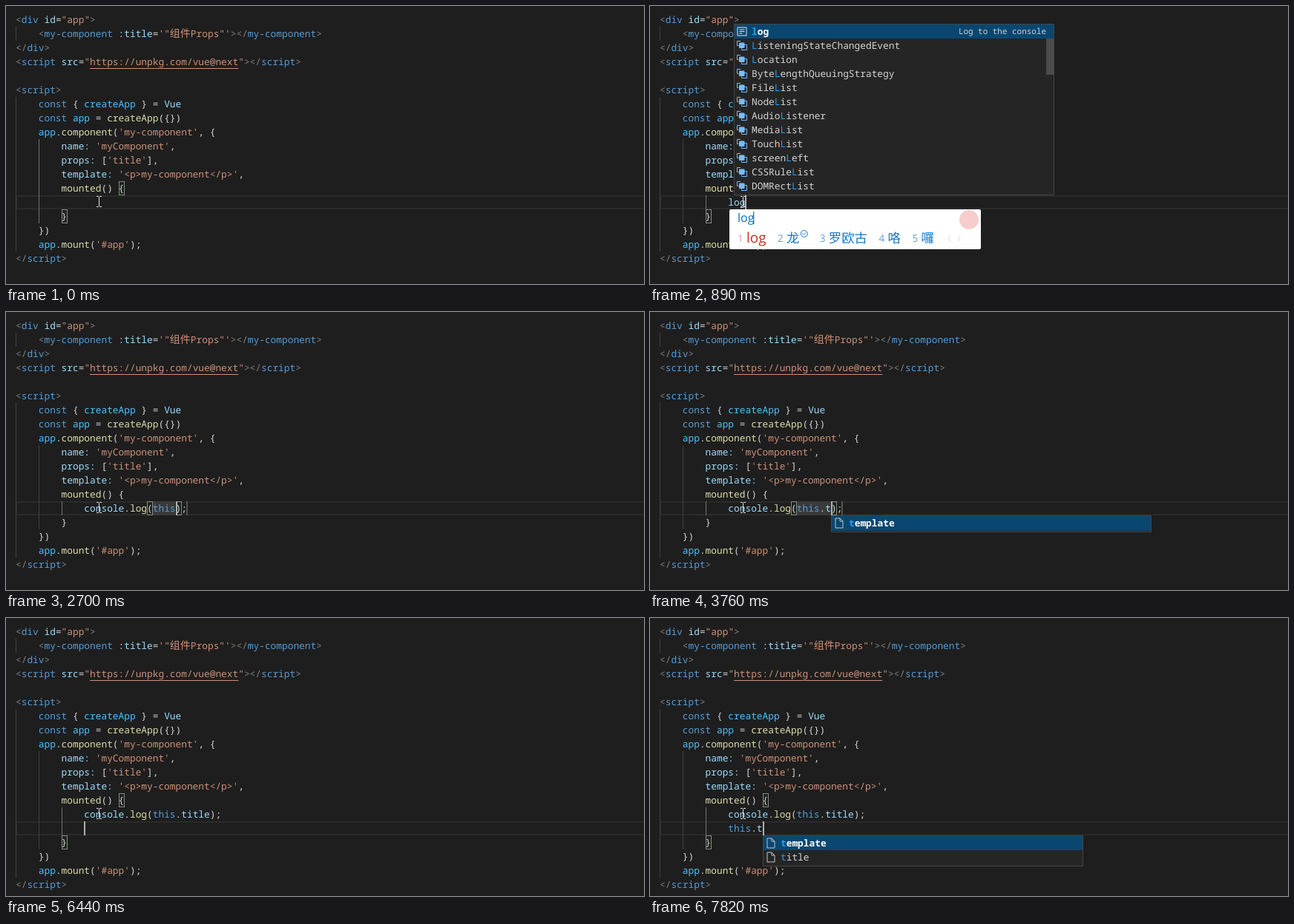
Animation of 860x376 px, one loop 8 s. Source, as an HTML page:

```html
<!DOCTYPE html>
<html lang="zh">
<head>
<meta charset="utf-8">
<title>Typing in a code editor</title>
<style>
  html, body { margin: 0; width: 860px; height: 376px; overflow: hidden; background: #1e1e1e; }
  svg { display: block; }
  text {
    white-space: pre;
    text-rendering: geometricPrecision;
    font: 12.83px "Noto Sans Mono", "DejaVu Sans Mono", monospace;
  }
  .cjk { font: 14px "Noto Sans CJK SC", "Noto Sans CJK", sans-serif; }
  .ime text { font-family: "Open Sans", "Noto Sans CJK SC", "Noto Sans CJK", sans-serif; }
</style>
</head>
<body>
<svg id="stage" width="860" height="376" viewBox="0 0 860 376"></svg>
<script>
const LOOP = 8000, LEFT = 13, TOP = 9, PITCH = 7.697, LINE = 19, EDIT = 13;
const stage = document.getElementById('stage');

const colX = col => LEFT + col * PITCH;
const rowY = row => TOP + row * LINE;
const esc = s => s.replace(/&/g, '&amp;').replace(/</g, '&lt;');
const rect = (x, y, w, h, fill, extra = '') =>
  `<rect x="${x}" y="${y}" width="${w}" height="${h}" fill="${fill}" ${extra}/>`;
const text = (x, y, body, extra = '') => `<text x="${x}" y="${y}" ${extra}>${body}</text>`;

// Code lines: [indent column, tokens]. Each token starts with its colour key.
const INK = {
  g: '#808080', b: '#569cd6', v: '#9cdcfe', s: '#ce9178', c: '#ce9178',
  f: '#dcdcaa', k: '#4fc1ff', w: '#d4d4d4'
};
const head = [
  [0, 'g<~bdiv ~vid~w=~s"app"~g>'],
  [4, `g<~bmy-component ~v:title~w=~s'"~c组件~sProps"'~g></~bmy-component~g>`],
  [0, 'g</~bdiv~g>'],
  [0, 'g<~bscript ~vsrc~w=~s"https://unpkg.com/vue@next"~g></~bscript~g>'],
  [0, ''],
  [0, 'g<~bscript~g>'],
  [4, 'bconst~w { ~kcreateApp~w } = ~vVue'],
  [4, 'bconst ~kapp~w = ~fcreateApp~w({})'],
  [4, "kapp~w.~fcomponent~w(~s'my-component'~w, {"],
  [8, "vname: ~s'myComponent'~w,"],
  [8, "vprops:~w [~s'title'~w],"],
  [8, "vtemplate: ~s'<p>my-component</p>'~w,"],
  [8, 'fmounted~w() {']
];
const tail = [
  [8, 'w}'],
  [4, 'w})'],
  [4, "kapp~w.~fmount~w(~s'#app'~w);"],
  [0, 'g</~bscript~g>']
];

const codeLine = ([col, src], row) => text(colX(col), rowY(row) + 14,
  src.split('~').filter(s => s.length > 1).map(s =>
    `<tspan fill="${INK[s[0]]}"${s[0] === 'c' ? ' class="cjk"' : ''}>${esc(s.slice(1))}</tspan>`).join(''));

const expr = s => s.startsWith('this')
  ? `bthis~w${s.slice(4, 5)}~v${s.slice(5)}` : 'v' + s;
const callSrc = arg => `vconsole~w.~flog~w(~${expr(arg)}~w);`;

// Suggestion lists
const items = (icon, names) => names.split(' ').map(name => ({ icon, name }));
const logItem = { icon: 'snippet', name: 'log', detail: 'Log to the console' };
const members = 'app component console createApp log mount mounted name props template';
const types = [logItem, ...items('type', 'ListeningStateChangedEvent Location ' +
  'ByteLengthQueuingStrategy FileList NodeList AudioListener MediaList TouchList ' +
  'screenLeft CSSRuleList DOMRectList')];
const pop = (col, list, match, opts) => ({ col, list, match, ...opts });

// Editor states
const word = (w, more) => ({ rows: ['v' + w], caret: 12 + w.length, brace: true, ...more });
const call = (arg, more) => ({ rows: [callSrc(arg)], caret: 24 + arg.length, arg, ...more });
const next = (s, popup) => ({
  rows: [callSrc('this.title'), expr(s)], caret: 12 + s.length, brace: true, popup
});

const typesPop = pop(13, types, /L|^l/, { above: true, thumb: true });
const onT = items('word', 'template');
const steps = [
  [0, { rows: [''], brace: true }],
  [450, word('l', { ime: ['l', '了', '来', '里', '老', '类'] })],
  [597, word('l', { ime: ['l', '了', '来', '里', '老', '类'], popup: typesPop })],
  [743, word('lo', { ime: ['lo', '咯', '罗', '落', '洛', '络'], popup: typesPop })],
  [890, word('log', { ime: ['log', 'log', '龙', '罗欧古', '咯', '囉'], popup: typesPop })],
  [1180, word('log', { popup: pop(15, [logItem, ...items('type', 'HTMLDialogElement')], /log/) })],
  [1650, call('')],
  [2250, call('t')],
  [2400, call('th')],
  [2550, call('thi')],
  [2700, call('this')],
  [3140, call('this.', { popup: pop(29, items('word', members + ' Vue')) })],
  [3610, call('this.t', { popup: pop(29, onT, /^t/) })],
  [3760, call('this.t', { popup: pop(30, onT, /^t/) })],
  [4060, call('this.ti')],
  [4380, call('this.tit')],
  [4950, call('this.titl')],
  [5250, call('this.title')],
  [5690, call('this.title', { caret: 35 })],
  [5845, call('this.title', { caret: 36, brace: true })],
  [6000, { rows: [callSrc('this.title')], caret: 36, brace: true }],
  [6440, next('')],
  [6910, next('t')],
  [7063, next('th')],
  [7217, next('thi')],
  [7370, next('this', pop(16, [...items('snippet', 'this'), ...items('type', 'globalThis ThisType')], /this/i))],
  [7670, next('this.', pop(17, items('word', members + ' title Vue'), null, { above: true }))],
  [7820, next('this.t', pop(18, items('word', 'template title'), /^t/))]
];

const bracket = (col, row) => rect(Math.round(colX(col)) + .5, rowY(row) + .5, 7, 18,
  'rgba(0,100,0,.1)', 'stroke="#888"');

const guide = (col, from, to, active) =>
  rect(Math.round(colX(col)), rowY(from), 1, (to - from) * LINE, active ? '#707070' : '#404040');

const ICONS = {
  snippet: '<path d="M-6 -5.5h12v11h-12zM-3.5 -2.5h7M-3.5 0h7M-3.5 2.5h4" stroke="#e4e4e4"/>',
  type: '<path d="M-2 -6h-4.5v6h2M3 -1h3.500v7h-7v-2" stroke="#75beff"/>' +
    '<rect x="-4" y="-4" width="7.500" height="7.500" rx="1" fill="#75beff"/>',
  word: '<path d="M-5 -6.500h6l4 4v9h-10zM1 -6.500v4h4" stroke="#c5c5c5"/>'
};

function drawPopup({ col, list, match, above, thumb }, row) {
  const x = Math.round(colX(col)), w = 432, h = list.length * LINE + 4;
  const y = above ? rowY(row) - h : rowY(row + 1);
  let out = rect(x + .5, y + .5, w - 1, h - 1, '#252526', 'stroke="#454545"');
  out += rect(x + 1, y + 1, w - 2, LINE + (list.length === 1 ? 1 : 0), '#094771');
  list.forEach(({ icon, name, detail }, i) => {
    const top = y + 1 + i * LINE;
    const label = match ? name.replace(match, m => `<tspan fill="#18a3ff">${m}</tspan>`) : name;
    out += `<g fill="none" transform="translate(${x + 11} ${top + 9.5})">${ICONS[icon]}</g>`;
    out += text(x + 24, top + 14, label,
      i ? 'fill="#d4d4d4"' : 'fill="#fff" style="font-weight:bold"');
    if (detail) out += text(x + 421, top + 13, detail,
      'fill="#c8d3dc" text-anchor="end" style="font-size:10.95px"');
  });
  if (thumb) out += rect(x + w - 11, y + 20, 10, 49, '#4b4b4b');
  return out;
}

function drawIme([typed, ...words]) {
  const size = n => `style="font-size:${n}px"`;
  const width = s => s.length * (s < '~' ? 8.8 : 17.4);
  let x = 118;
  let out = rect(107, 275, 339, 54, '#fff', 'rx="2"') +
    '<circle cx="430" cy="289" r="13" fill="#f6cccc"/>' +
    text(118, 292, typed, 'fill="#0f6cb4" ' + size(16)) +
    rect(118 + typed.length * 7.100, 278, 1, 17, '#0f4f86');
  words.forEach((w, i) => {
    out += text(x, 319, i + 1, `fill="${i ? '#5b9fd6' : '#f08fae'}" ` + size(13.5));
    out += text(x + 12, 320, w, `fill="${i ? '#1277c8' : '#c8301c'}" ` + size(w < '~' ? 19 : 17.4));
    x += 12 + width(w);
    if (w === '龙') {
      out += `<g transform="translate(${x + 6.5} 308)" fill="none" stroke="#1277c8">` +
        '<circle r="4.500"/><path d="M-2 0l1.500 1.500 3 -3"/></g>';
      x += 12;
    }
    x += 15.5;
  });
  out += '<path d="M405 311l-3 3.500 3 3.500M415 311l3 3.500 -3 3.500" fill="none" stroke="#bcdcf2"/>';
  return `<g class="ime">${out}</g>`;
}

function draw({ rows, caret, brace, arg, popup, ime }) {
  const n = rows.length, row = EDIT + n - 1, y = rowY(row), end = EDIT + n;
  const empty = rows[0] === '';
  let out = rect(0, 0, 860, 376, '#1e1e1e');
  out += rect(LEFT + 1, y + 1, 900, LINE - 2, 'none', 'stroke="#2a2a2a" stroke-width="2"');
  out += guide(0, 1, 2) + guide(0, 6, end + 3) + guide(4, 9, end + 1, empty);
  if (!empty) out += guide(8, EDIT, end, true);

  if (arg !== undefined) {
    out += rect(colX(24), y, arg.length * PITCH, LINE, '#3a3a3b');
    out += rect(Math.round(colX(26 + arg.length)) - 1, y, 2, LINE, '#525252');
  }
  if (brace) out += bracket(18, 12) + bracket(8, end);
  else out += bracket(23, row) + bracket(24 + arg.length, row);

  const lines = [...head, ...rows.map(r => [12, r]), ...tail];
  out += lines.map(codeLine).join('');
  out += rect(colX(13), 84, 26 * PITCH, 1, INK.s);

  if (caret) out += rect(Math.round(colX(caret)), y, 2, LINE, '#aeafad');
  if (popup) out += drawPopup(popup, row);
  if (ime) out += drawIme(ime);
  out += '<path transform="translate(125.500 264.500)" fill="none" stroke="#e6e6e6" ' +
    'd="M-3.500 -7h2.500l1 1 1 -1h2.500M0 -6v12M-3.500 7h2.500l1 -1 1 1h2.500"/>';
  stage.innerHTML = out;
}

const start = performance.now();
let shown = -1;
function tick() {
  const t = (performance.now() - start) % LOOP;
  const now = steps.findLastIndex(([at]) => at <= t);
  if (now !== shown) draw(steps[shown = now][1]);
  requestAnimationFrame(tick);
}
tick();
</script>
</body>
</html>
```
